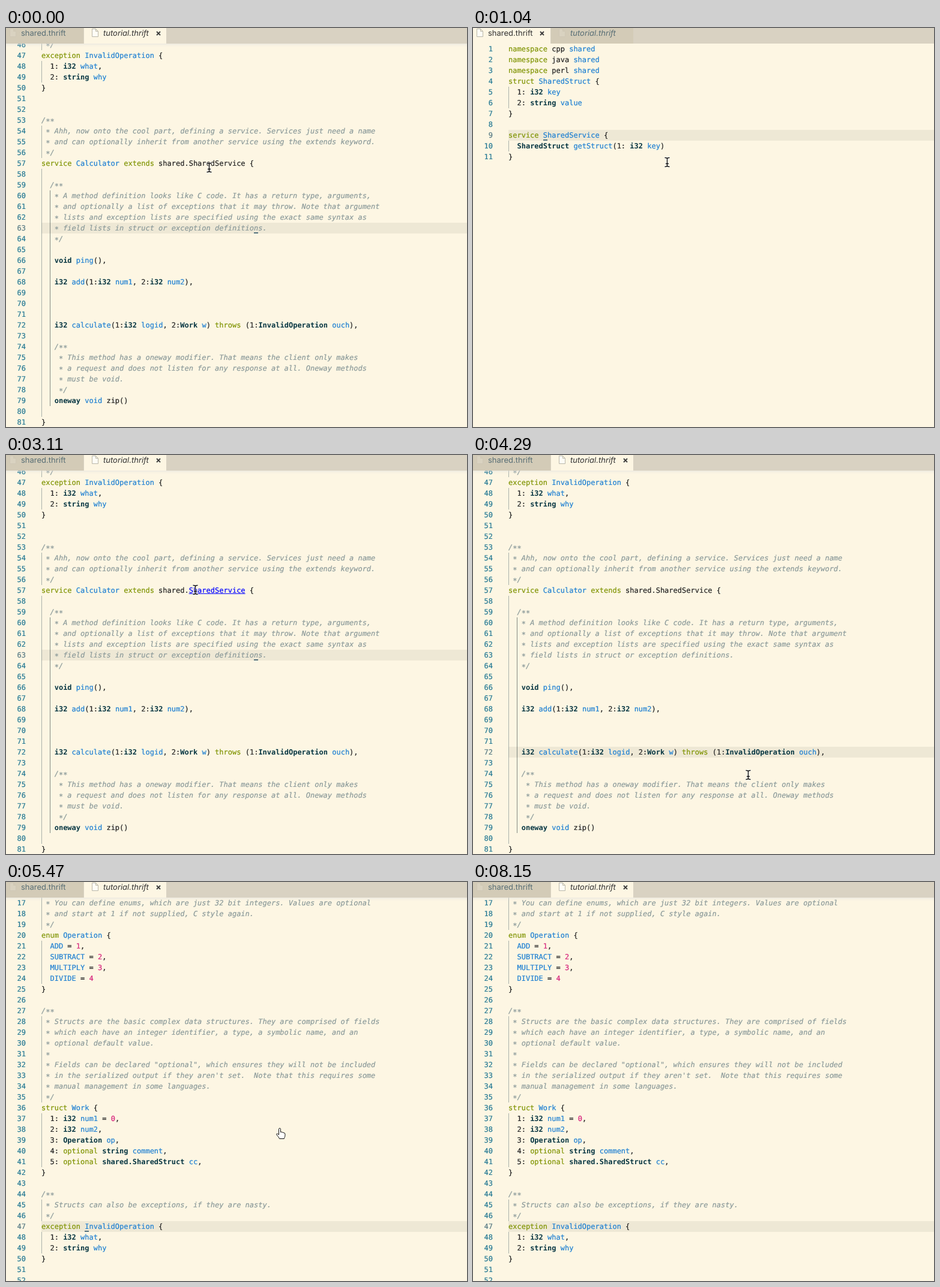
An HTML page that plays this animation: 768x666 px, repeating every 8.25 s.

```html
<!DOCTYPE html>
<html lang="en">
<head>
<meta charset="utf-8">
<title>Go to definition</title>
<style>
html, body { margin: 0; width: 100%; height: 100%; overflow: hidden; background: #fdf6e3; }
#stage { position: absolute; left: 0; top: 0; width: 768px; height: 666px; overflow: hidden; background: #fdf6e3; text-rendering: geometricPrecision; }
#shade { position: absolute; left: 0; top: 26px; width: 768px; height: 6px; box-shadow: #ddd 0 6px 6px -6px inset; }
#tabs { position: absolute; left: 0; top: 0; width: 768px; height: 26px; background: #d9d2c2; font: 13px/18px Inter, sans-serif; }
.tab { position: absolute; top: 0; height: 26px; background: #d3cbb7; color: #586e75; }
.tab.active { background: #fdf6e3; color: #333; }
.tab span { position: absolute; top: 0; white-space: pre; }
.tab svg { position: absolute; top: 1px; opacity: .15; }
.tab.active svg { opacity: 1; }
.tab .close { top: 5px; opacity: 0; }
.tab.active .close, .tab.hover .close { opacity: 1; }
.doc { position: absolute; left: 0; top: 0; width: 768px; font: 12px/18px "DejaVu Sans Mono", "Liberation Mono", monospace; color: #222; -webkit-text-stroke: .2px; }
.row { position: absolute; left: 0; width: 768px; height: 18px; white-space: pre; }
.row.on::before { content: ""; position: absolute; left: 59px; top: 0; width: 709px; height: 18px; background: #eee8d5; }
.no { position: absolute; left: 0; width: 33px; text-align: right; color: #237893; }
.row.on .no { color: #567983; }
.code { position: absolute; left: 59px; }
.guide { position: absolute; width: 1px; background: rgba(88, 110, 117, .5); }
.guide.dark { background: rgba(8, 30, 37, .5); }
.c { color: #8a9999; font-style: italic; }
.star { position: relative; top: 2px; }
.k { color: #7f9300; }
.b { color: #1c7fd2; }
.t { color: #073642; font-weight: bold; -webkit-text-stroke: 0; }
.n { color: #d6207a; }
.link { color: #00f; text-decoration: underline; }
#caret { position: absolute; width: 7px; height: 2px; background: #53717d; }
#mouse { position: absolute; left: 0; top: 0; overflow: visible; }
</style>
</head>
<body>
<div id="stage">
  <div id="docs"></div>
  <div id="shade"></div>
  <div id="caret"></div>
  <div id="tabs"></div>
  <svg id="mouse" width="1" height="1">
    <defs>
      <path id="beamPath" d="M-3.5-7.5q3 0 3.5 1.5q.5-1.5 3.5-1.5M0-6V6M-3.5 7.5q3 0 3.5-1.5q.5 1.5 3.5 1.5M-2 2.5h4"/>
    </defs>
    <g id="beam" fill="none" stroke-linecap="round" transform="translate(.5 0)">
      <use href="#beamPath" stroke="#fff" stroke-opacity=".7" stroke-width="3"/>
      <use href="#beamPath" stroke="#111" stroke-width="1.4"/>
    </g>
    <path id="hand" fill="#fff" stroke="#111" stroke-linejoin="round"
      d="M-1.5.5a1.5 1.5 0 0 1 3 0V5.5q2.6-1 2.8.6q2.4-.6 2.6.8q2-.2 2 1.6v3q0 2-1.5 4v1H-.5q-1-3-3.8-5.5q-1.8-2.2-.6-2.8q1.2-.6 3.4 1.7z"/>
  </svg>
</div>
<script>
const LOOP = 8250, ROW = 18, TOP = 26, LEFT = 59, CHAR = 7.224;
const $ = id => document.getElementById(id);

// Marks: #keyword# @name@ !type! %number% ~link~ ^type link^
const shared = `#namespace# cpp @shared@
#namespace# java @shared@
#namespace# perl @shared@
#struct# @SharedStruct@ {
  1: !i32! @key@
  2: !string! @value@
}

#service# @SharedService@ {
  !SharedStruct! @getStruct@(1: !i32! @key@)
}`;

const tutorial = ` * You can define enums, which are just 32 bit integers. Values are optional
 * and start at 1 if not supplied, C style again.
 */
#enum# @Operation@ {
  @ADD@ = %1%,
  @SUBTRACT@ = %2%,
  @MULTIPLY@ = %3%,
  @DIVIDE@ = %4%
}

/**
 * Structs are the basic complex data structures. They are comprised of fields
 * which each have an integer identifier, a type, a symbolic name, and an
 * optional default value.
 *
 * Fields can be declared "optional", which ensures they will not be included
 * in the serialized output if they aren't set.  Note that this requires some
 * manual management in some languages.
 */
#struct# @Work@ {
  1: !i32! @num1@ = %0%,
  2: !i32! @num2@,
  3: !Operation! @op@,
  4: #optional# !string! @comment@,
  5: #optional# !shared.SharedStruct! @cc@,
}

/**
 * Structs can also be exceptions, if they are nasty.
 */
#exception# @InvalidOperation@ {
  1: !i32! @what@,
  2: !string! @why@
}


/**
 * Ahh, now onto the cool part, defining a service. Services just need a name
 * and can optionally inherit from another service using the extends keyword.
 */
#service# @Calculator@ #extends# shared.~SharedService~ {

  /**
   * A method definition looks like C code. It has a return type, arguments,
   * and optionally a list of exceptions that it may throw. Note that argument
   * lists and exception lists are specified using the exact same syntax as
   * field lists in struct or exception definitions.
   */

   !void! @ping@(),

   !i32! @add@(1:!i32! @num1@, 2:!i32! @num2@),



   !i32! @calculate@(1:!i32! @logid@, 2:!Work! @w@) #throws# (1:^InvalidOperation^ @ouch@),

   /**
    * This method has a oneway modifier. That means the client only makes
    * a request and does not listen for any response at all. Oneway methods
    * must be void.
    */
   !oneway! @void@ zip()

}
`;

const kinds = { "#": "k", "@": "b", "!": "t", "%": "n", "~": "jump", "^": "t jump" };
const paint = s => /^\s*(\/\*|\*)/.test(s)
  ? `<span class="c">${s.replace(/\*+/g, '<span class="star">$&</span>')}</span>`
  : s.replace(/([#@!%~^])(.+?)\1/g, (_, m, word) => `<span class="${kinds[m]}">${word}</span>`);

// guides: [column, first line, last line, dark]
function makeDoc(text, first, guides) {
  const doc = document.createElement("div");
  doc.className = "doc";
  doc.rows = {};
  text.split("\n").forEach((s, i) => {
    const n = first + i, row = document.createElement("div");
    row.className = "row";
    row.style.top = (n - 1) * ROW + "px";
    row.innerHTML = `<span class="no">${n}</span><span class="code">${paint(s)}</span>`;
    doc.append(row);
    doc.rows[n] = row;
  });
  for (const [col, a, b, dark] of guides) {
    const g = document.createElement("div");
    g.className = dark ? "guide dark" : "guide";
    g.style.cssText = `left:${Math.floor(LEFT + col * CHAR)}px;top:${(a - 1) * ROW}px;height:${(b - a + 1) * ROW}px`;
    doc.append(g);
  }
  $("docs").append(doc);
  return doc;
}

const docs = [
  makeDoc(shared, 1, [[0, 5, 6], [0, 10, 10]]),
  makeDoc(tutorial, 17, [[0, 17, 19], [0, 21, 24], [0, 28, 35], [0, 37, 41], [0, 45, 46],
    [0, 48, 49], [0, 54, 56], [0, 58, 80], [2, 60, 79, true]])
];
const links = [...docs[1].querySelectorAll(".jump")];

function makeTab(name, x, width, textX, closeX, italic) {
  const tab = document.createElement("div");
  tab.className = "tab";
  tab.style.cssText = `left:${x}px;width:${width}px`;
  tab.innerHTML = `<svg style="left:${textX - 20}px" width="13" height="15" fill="#fffdf5" stroke="#b9b7aa">
      <path d="M1.5.5h6l4 4v9h-10zM7.5.5v4h4"/></svg>
    <span style="left:${textX}px;${italic ? "font-style:italic" : ""}">${name}</span>
    <svg class="close" style="left:${closeX - 4}px" width="8" height="8" stroke="#3b3b3b" stroke-width="1.9">
      <path d="M1 1L7 7M7 1L1 7"/></svg>`;
  $("tabs").append(tab);
  return tab;
}
const tabs = [
  makeTab("shared.thrift", 0, 129, 25, 115, false),
  makeTab("tutorial.thrift", 130, 137, 32, 124, true)
];

// Each step changes only the listed fields.
const steps = [
  [0, { file: 1, scroll: 817, line: 63, col: 49, caret: 1, x: 338, y: 233, hand: 0, link: -1, mouse: 1 }],
  [140, { x: 333, y: 230 }],
  [290, { x: 325, y: 226 }],
  [440, { x: 323, y: 224, caret: 0 }],
  [590, { hand: 1, link: 0 }],
  [890, { file: 0, scroll: 0, line: 9, col: 8, caret: 1 }],
  [1040, { hand: 0 }],
  [1480, { x: 321, y: 218, caret: 0 }],
  [1630, { x: 306, y: 190 }],
  [1780, { x: 280, y: 146 }],
  [1930, { x: 248, y: 92 }],
  [2080, { x: 220, y: 45, caret: 1 }],
  [2230, { x: 203, y: 16, hand: 1 }],
  [2380, { x: 195, y: 6 }],
  [2530, { caret: 0 }],
  [2680, { file: 1, scroll: 817, line: 63, col: 49, caret: 1 }],
  [2820, { x: 210, y: 34, hand: 0 }],
  [2970, { x: 250, y: 110 }],
  [3110, { x: 315, y: 225 }],
  [3260, { x: 380, y: 340, caret: 0 }],
  [3400, { x: 435, y: 445 }],
  [3550, { x: 458, y: 495 }],
  [3700, { line: 72, col: 55, caret: 1 }],
  [3850, { link: -1 }],
  [4140, { y: 518, caret: 0 }],
  [4290, { y: 534 }],
  [4430, { scroll: 859 }],
  [4580, { scroll: 901 }],
  [4730, { y: 505, caret: 1 }],
  [4870, { x: 457, y: 450 }],
  [5020, { x: 456, y: 412 }],
  [5170, { hand: 1, link: 1, caret: 0 }],
  [5320, { scroll: 288, line: 47, col: 10, caret: 1 }],
  [5470, { link: -1 }],
  [5610, { hand: 0 }],
  [6210, { x: 450, y: 410, caret: 0 }],
  [6350, { x: 443, y: 409 }],
  [6650, { y: 416, caret: 1 }],
  [6790, { x: 446, y: 576 }],
  [7090, { x: 450, y: 578, caret: 0 }],
  [7240, { x: 490, y: 590 }],
  [7380, { x: 575, y: 615 }],
  [7530, { x: 665, y: 642 }],
  [7670, { x: 727, y: 662, caret: 1 }],
  [7820, { mouse: 0 }],
  [8150, { caret: 0 }]
];

const show = (el, on) => { el.style.visibility = on ? "visible" : "hidden"; };

function draw(s) {
  docs.forEach((doc, i) => {
    doc.style.display = i === s.file ? "block" : "none";
    tabs[i].classList.toggle("active", i === s.file);
    for (const n in doc.rows) doc.rows[n].classList.toggle("on", +n === s.line);
  });
  docs[s.file].style.top = TOP - s.scroll + "px";
  show($("shade"), s.scroll > 0);
  tabs[1].classList.toggle("hover", s.hand && s.y < TOP);
  links.forEach((el, i) => el.classList.toggle("link", i === s.link));
  $("caret").style.left = Math.round(LEFT + s.col * CHAR) + "px";
  $("caret").style.top = TOP + s.line * ROW - s.scroll - 2 + "px";
  show($("caret"), s.caret);
  $("mouse").style.transform = `translate(${s.x}px,${s.y}px)`;
  show($("beam"), s.mouse && !s.hand);
  show($("hand"), s.mouse && s.hand);
}

const start = performance.now();
let last = -1;
function tick() {
  const t = (performance.now() - start) % LOOP;
  const past = steps.filter(([at]) => at <= t);
  if (past.length !== last) {
    last = past.length;
    draw(Object.assign({}, ...past.map(p => p[1])));
  }
  requestAnimationFrame(tick);
}
tick();
</script>
</body>
</html>
```
